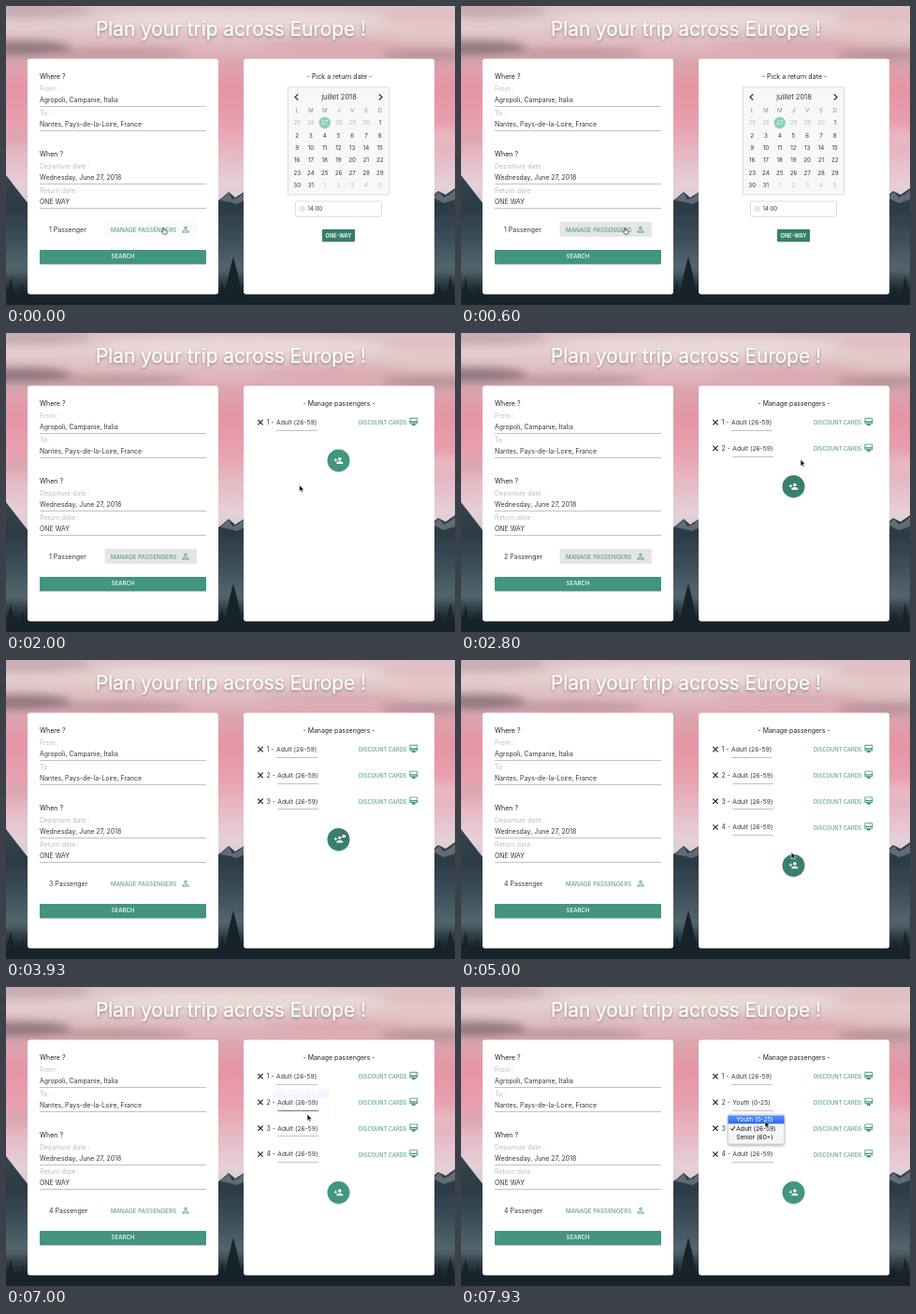
Animation of 480 by 320 pixels, one loop 8000 ms. Source, as an HTML page:

```html
<!DOCTYPE html>
<html lang="en">
<head>
<meta charset="utf-8">
<title>Trip planner</title>
<style>
html, body { margin: 0; width: 100%; height: 100%; overflow: hidden; background: #1f2c33; }
svg { display: block; width: 100vw; height: 100vh; }
text { font-family: Inter, "Open Sans", sans-serif; white-space: pre; }
</style>
</head>
<body>
<svg id="stage" viewBox="0 0 480 320" xmlns="http://www.w3.org/2000/svg"></svg>
<script>
const GREEN = '#40957e', DARK = '#363636', PALE = '#bdbdbd', LINE = '#c2c2c2';
const LOOP = 8000, TICK = 200 / 3;
const ROW_Y = 95.6, ROW_GAP = 27.8;

// Text placed by the middle of its capitals
const text = (x, y, s, size = 7, fill = DARK, extra = '') =>
  `<text x="${x}" y="${(y + size * 0.36).toFixed(2)}" font-size="${size}" fill="${fill}" ${extra}>${s}</text>`;
const mid = 'text-anchor="middle"';
const rect = (x, y, w, h, fill, extra = '') =>
  `<rect x="${x}" y="${y}" width="${w}" height="${h}" fill="${fill}" ${extra}/>`;
const blob = (x, y, rx, ry, fill, o) =>
  `<ellipse cx="${x}" cy="${y}" rx="${rx}" ry="${ry}" fill="${fill}" opacity="${o}"/>`;
const icon = (x, y, size, fill, d) =>
  `<path transform="translate(${x - size / 2} ${y - size / 2}) scale(${size / 24})" fill="${fill}" d="${d}"/>`;
const hline = (x, y, w, extra = '') =>
  `<path d="M${x} ${Math.floor(y) + 0.5}h${w}" stroke="${LINE}" ${extra}/>`;

const ICONS = {
  person: 'M12 4a4 4 0 1 0 0 8 4 4 0 1 0 0-8zm0 2a2 2 0 1 1 0 4 2 2 0 1 1 0-4zM12 13.5c-2.9 0-8.5 1.4-8.5 4.3v2.7h17v-2.7c0-2.9-5.6-4.3-8.5-4.3zm0 2c3 0 6.5 1.5 6.5 2.4v.6h-13v-.6c0-.9 3.5-2.4 6.5-2.4z',
  add: 'M15 4a4 4 0 1 0 0 8 4 4 0 1 0 0-8zM15 14c-2.7 0-8 1.3-8 4v2h16v-2c0-2.7-5.3-4-8-4zM6 10V7H4v3H1v2h3v3h2v-3h3v-2z',
  card: 'M20 2H4c-1.1 0-2 .9-2 2v11c0 1.1.9 2 2 2h4v5l4-2 4 2v-5h4c1.1 0 2-.9 2-2V4c0-1.1-.9-2-2-2zm0 13H4v-2h16zm0-5H4V4h16z'
};

function scenery() {
  const tree = (x, y, w) => `<path d="M${x} ${y}l${w * 0.3} 14 ${w * 0.7} 38h${-2 * w}l${w * 0.7}-38z" fill="#17232a"/>`;
  return rect(0, 0, 480, 320, 'url(#sky)') +
    '<g filter="url(#haze)">' +
    blob(20, 4, 70, 9, '#b79aa0', 0.6) + blob(250, 14, 150, 10, '#f0e2e0', 0.6) +
    blob(15, 45, 55, 8, '#7d686f', 0.8) + blob(120, 50, 75, 5, '#a68389', 0.6) +
    blob(350, 42, 80, 5, '#d59ca6', 0.6) + blob(450, 52, 50, 6, '#9d7a83', 0.6) +
    blob(455, 12, 50, 8, '#e3b4bb', 0.6) + blob(10, 142, 26, 7, '#c9a0aa', 0.5) +
    blob(470, 140, 26, 8, '#ecc3ca', 0.6) + '</g>' +
    '<path d="M0 181L10 194 24 212 90 232 200 226 230 206 238 199 245 205 256 198 270 210 420 215 450 208 462 198 470 202 480 195V320H0z" fill="url(#rock)"/>' +
    '<path d="M229 208L238 200 242 207 248 205 255 199V208L247 212 240 210zM456 205L463 199 468 205 474 202 480 197V207L468 211z" fill="#8a939d" opacity=".55"/>' +
    rect(0, 280, 480, 40, 'url(#ground)') +
    tree(243, 268, 12) + tree(231, 294, 9) + tree(254, 296, 9) + tree(5, 290, 9) + tree(18, 297, 9) +
    tree(463, 297, 9) + tree(475, 289, 10);
}

function form() {
  const field = (y, label, value) =>
    text(36, y, label, 7, PALE) + text(36, y + 12.2, value, 6.95) + hline(36, y + 19, 178);
  return text(36, 75, 'Where ?', 7.1, '#222') +
    field(88.3, 'From :', 'Agropoli, Campanie, Italia') +
    field(114, 'To :', 'Nantes, Pays-de-la-Loire, France') +
    text(36, 158, 'When ?', 7.1, '#222') +
    field(171.4, 'Departure date :', 'Wednesday, June 27, 2018') +
    field(197, 'Return date :', 'ONE WAY') +
    text(46, 239, '', 7, DARK, 'id="count"') +
    rect(105.5, 231, 98.5, 16, '#000', 'id="manage" rx="1"') +
    text(112, 239.3, 'MANAGE PASSENGERS', 6.3, GREEN) +
    icon(192, 239, 10, GREEN, ICONS.person) +
    rect(36, 261, 178, 15, '#43957f', 'rx="1" filter="url(#low)"') +
    text(125, 268.2, 'SEARCH', 6.1, '#fff', mid + ' font-weight="500"');
}

function calendar() {
  let s = text(356.5, 75, '- Pick a return date -', 7.1, '#222', mid) +
    rect(301.5, 87, 108, 115, '#f8f8f8', 'stroke="#d8d8d8" stroke-width=".8"') +
    '<path d="M312.3 94.3L309 97.5l3.3 3.2M398.7 94.3l3.3 3.2-3.3 3.2" fill="none" stroke="#222" stroke-width="1.1"/>' +
    text(356, 97.6, 'juillet 2018', 7.5, DARK, mid) +
    '<circle cx="340.7" cy="125" r="6.2" fill="#8ccdbc"/>';
  const colX = c => 311.2 + c * 14.75;
  [...'LMMJVSD'].forEach((d, c) => s += text(colX(c), 111.5, d, 6, '#8b8b8b', mid));
  const first = new Date(2018, 5, 25);
  for (let i = 0; i < 42; i++) {
    const day = new Date(first);
    day.setDate(25 + i);
    const fill = i === 2 ? '#eefaf6' : day.getMonth() === 6 ? DARK : '#b9b9b9';
    s += text(colX(i % 7), 125 + Math.floor(i / 7) * 13.4, day.getDate(), 6.2, fill, mid);
  }
  return s + rect(309.5, 209, 92, 16.3, '#fff', 'rx="1.5" stroke="#d5d5d5" stroke-width=".8"') +
    '<g fill="none" stroke="#bbb" stroke-width=".7"><circle cx="316.7" cy="217" r="2.5"/><path d="M316.7 215.5V217.2H318"/></g>' +
    text(322.5, 217.2, '14:00', 6) +
    rect(338, 239, 35, 13, '#33806b', 'rx="1" filter="url(#low)"') +
    text(355.5, 245.6, 'ONE-WAY', 5.7, '#fff', mid + ' font-weight="600"');
}

function passengers() {
  let s = text(356, 75, '- Manage passengers -', 6.95, '#222', mid);
  for (let i = 0; i < 4; i++) {
    const y = ROW_Y + i * ROW_GAP, x = i ? 290.3 : 289;
    s += `<g id="row${i}"><path d="M269.3 ${y - 2.7}l5.4 5.4m0-5.4l-5.4 5.4" stroke="#222" stroke-width="1.1"/>` +
      text(278.5, y, `${i + 1} -`, 6.9) + text(x, y, 'Adult (26-59)', 6.75, DARK, `id="age${i}"`) +
      hline(x, y + 8.6, 43.8, `id="line${i}"`) +
      text(377, y + 0.5, 'DISCOUNT CARDS', 5.75, GREEN) + icon(435.8, y - 0.4, 10.5, GREEN, ICONS.card) + '</g>';
  }
  return s + '<g id="add"><circle id="disc" r="11.9" filter="url(#low)"/>' + icon(0, 0, 10.5, '#fff', ICONS.add) + '</g>';
}

function popup() {
  return '<g id="popup">' +
    rect(285.5, -15.3, 60, 32, '#f6f6f6', 'rx="2.5" stroke="#c2c2c2" stroke-width=".5" filter="url(#deep)"') +
    rect(285.5, 0, 60, 9, 'url(#blue)', 'id="pick"') +
    ['Youth (0-25)', 'Adult (26-59)', 'Senior (60+)'].map((s, i) =>
      text(294.3, (i - 1) * 9.35, s, 6.6, '#111', `id="opt${i}"`)).join('') +
    '<path id="check" d="M288.6 .2l1.6 2 2.6-4.4" fill="none" stroke-width="1"/></g>';
}

const gradient = (id, ...stops) => `<linearGradient id="${id}" x2="0" y2="1">` +
  stops.map(([o, c, a = 1]) => `<stop offset="${o}" stop-color="${c}" stop-opacity="${a}"/>`).join('') + '</linearGradient>';
const shadow = (id, dy, blur, a) =>
  `<filter id="${id}" x="-30%" y="-40%" width="160%" height="200%"><feDropShadow dx="0" dy="${dy}" stdDeviation="${blur}" flood-color="#000" flood-opacity="${a}"/></filter>`;

const stage = document.getElementById('stage');
stage.innerHTML = '<defs>' +
  gradient('sky', [0, '#dcc3c6'], [0.06, '#e4cecf'], [0.12, '#dfbec2'], [0.19, '#dba5ae'], [0.28, '#e595a4'], [0.4, '#e8a1af'], [0.5, '#e6bac4'], [0.6, '#e6d0d7'], [0.66, '#d3cad3']) +
  gradient('rock', [0, '#35444e'], [0.25, '#2b3b45'], [0.5, '#3d4f59'], [0.75, '#566972'], [1, '#3a4b54']) +
  gradient('ground', [0, '#17232a', 0], [0.7, '#17232a']) +
  gradient('blue', [0, '#5b94fb'], [1, '#2a68ee']) +
  shadow('low', 0.8, 0.6, 0.3) + shadow('deep', 1.5, 1.8, 0.35) +
  '<filter id="haze" x="-20%" y="-20%" width="140%" height="140%"><feGaussianBlur stdDeviation="5"/></filter></defs>' +
  scenery() +
  text(240.5, 24.8, 'Plan your trip across Europe !', 20.8, '#fff', mid + ' filter="url(#deep)"') +
  rect(23, 56.5, 204, 252, '#fff', 'rx="3" filter="url(#low)"') +
  rect(254, 56.5, 204, 252, '#fff', 'rx="3" filter="url(#low)"') +
  form() + `<g id="calendar">${calendar()}</g><g id="panel">${passengers()}</g>` + popup() +
  '<path id="arrow" d="M0 0V7.2L1.7 5.7 2.8 8.2 4 7.7 2.9 5.2H5.2z" fill="#111" stroke="#fff" stroke-width=".6"/>' +
  '<path id="hand" d="M-.7 .5Q0-.4 .6 .5V2.6L3 3.1Q3.9 3.4 3.7 4.6L3.2 6.8H-.3L-2.2 4.2Q-2 3.3-.7 4.2z" fill="#fff" stroke="#111" stroke-width=".6"/>';

const el = {};
stage.querySelectorAll('[id]').forEach(e => el[e.id] = e);
const set = (id, name, value) => el[id].setAttribute(name, value);
const show = (id, on) => set(id, 'opacity', +on);
const clamp = v => Math.min(1, Math.max(0, v));
const ramp = (t, a, b) => clamp((t - a) / (b - a));
const mix = (a, b, k) => a + (b - a) * k;

// Pointer stops: time, x, y
const PATH = [
  [0, 168.5, 237.3], [330, 175.3, 237.3], [1600, 175.3, 237.3], [2200, 362, 136.5], [2400, 363, 136],
  [2730, 363, 135.3], [2800, 363, 135.3], [3330, 358, 163], [3730, 358, 163], [3930, 360, 184],
  [4270, 360, 184], [4530, 356, 213], [4930, 356, 213], [5330, 320, 122], [6200, 320, 122],
  [6530, 321, 112.5], [6800, 321, 112.5], [7000, 322, 136], [7270, 322, 147.5], [7800, 322, 147.5],
  [7930, 325, 143.3], [8000, 325, 143.3]
];

function pointer(t) {
  const i = Math.max(1, PATH.findIndex(p => p[0] >= t));
  const [a, b] = [PATH[i - 1], PATH[i]];
  const k = ramp(t, a[0], b[0]), e = k * k * (3 - 2 * k);
  return [mix(a[1], b[1], e), mix(a[2], b[2], e)];
}

function drawPopup(t) {
  const second = t >= 7500;
  const fade = second ? 1 : t < 5590 ? 0 : 1 - ramp(t, 6780, 7015);
  show('popup', fade);
  const chosen = second ? (t >= 7850 ? 0 : 1) : (t >= 6320 ? 0 : 1);
  set('popup', 'transform', `translate(0 ${ROW_Y + (second ? 2 : 1) * ROW_GAP})`);
  set('pick', 'y', (chosen - 1) * 9.35 - 4.5);
  for (let i = 0; i < 3; i++) set('opt' + i, 'fill', i === chosen ? '#fff' : '#111');
  set('check', 'stroke', chosen === 1 ? '#fff' : '#111');
}

function draw(t) {
  const n = 1 + (t >= 2790) + (t >= 3590) + (t >= 4190);
  const swap = ramp(t, 860, 1060);
  show('calendar', 1 - swap);
  show('panel', swap);
  el.count.textContent = `${n} Passenger`;
  for (let i = 0; i < 4; i++) show('row' + i, i < n);
  el.age1.textContent = t >= 7060 ? 'Youth (0-25)' : 'Adult (26-59)';
  set('line1', 'stroke', t >= 6720 && t < 7260 ? '#777' : LINE);

  // Hover, press and focus tints of the flat button
  const press = ramp(t, 790, 1130) * (1 - ramp(t, 1700, 2000));
  const tint = mix(0.02, 0.1, ramp(t, 0, 330)) * (1 - ramp(t, 2860, 3270));
  set('manage', 'fill', `rgb(0,${Math.round(70 * press)},${Math.round(50 * press)})`);
  set('manage', 'fill-opacity', mix(tint, 0.165, press));

  const addY = ROW_Y + 13 + n * ROW_GAP;
  set('add', 'transform', `translate(355.5 ${addY})`);
  set('disc', 'fill', t >= 2130 && t < 5130 ? '#39806d' : '#42957f');
  drawPopup(t);

  const [x, y] = pointer(t);
  const onAdd = t > 1060 && Math.hypot(x - 355.5, y - addY) < 12;
  const onManage = x > 105 && x < 204 && y > 231 && y < 247;
  for (const id of ['arrow', 'hand']) {
    set(id, 'transform', `translate(${x.toFixed(2)} ${y.toFixed(2)})`);
    show(id, (id === 'hand') === (onAdd || onManage));
  }
}

const start = performance.now();
function frame() {
  const t = (performance.now() - start) % LOOP;
  draw(Math.floor((t + 5) / TICK) * TICK % LOOP);
  requestAnimationFrame(frame);
}
frame();
</script>
</body>
</html>
```
